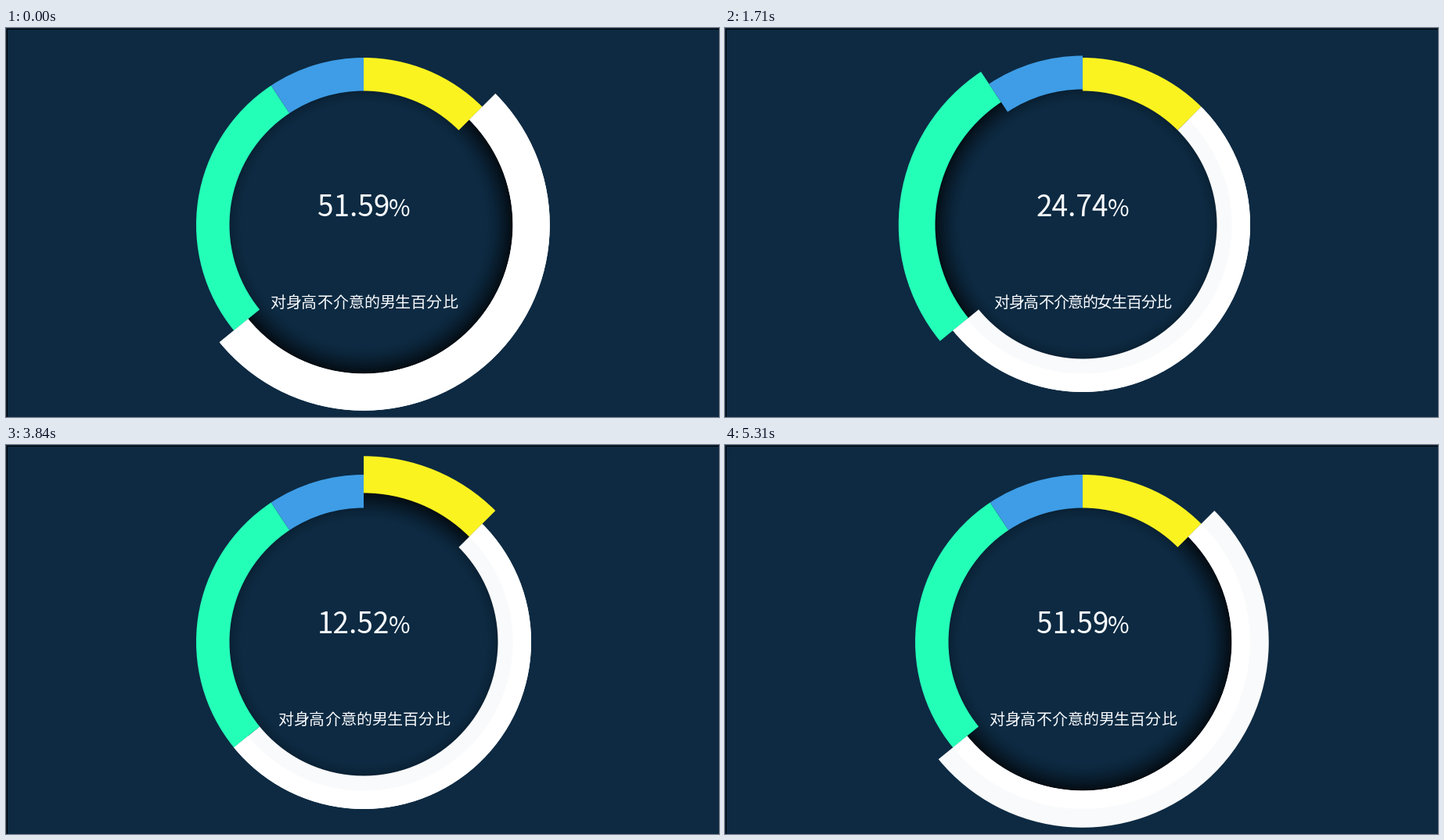
A matplotlib script that plays this animation: 911x498 px, repeating every 5.67 s.

```python
import numpy as np
import matplotlib.pyplot as plt
from matplotlib.animation import FuncAnimation
from matplotlib.patches import Wedge

W, H, DPI = 911, 498, 64
CX, CY = 457, 252
OUTER, INNER, GROW = 214, 171.5, 0.111
OUTER_BIG, INNER_BIG = OUTER * (1 + GROW), INNER * (1 + GROW)
STEP_MS, FRAMES, MORPH = 30, 189, 31
FONT = "Noto Sans CJK JP"
TEXT_COLOR = "#fafcff"

# name: (share, color, caption), clockwise from the top
SLICES = {
    "yellow": (12.52, "#fbf320", "对身高介意的男生百分比"),
    "white": (51.59, "#f9fafb", "对身高不介意的男生百分比"),
    "green": (26.57, "#24ffb8", "对身高不介意的女生百分比"),
    "blue": (9.32, "#3e9de6", "对身高介意的女生百分比"),
}
# start frame, slice that shrinks, slice that grows
MORPHS = [(0, "white", "green"), (48, "green", "blue"),
          (97, "blue", "yellow"), (145, "yellow", "white")]

# symmetric cubic Bezier easing
s = np.linspace(0, 1, 400)
EASE_Y = 3 * s**2 - 2 * s**3
EASE_X = 3 * (1 - s)**2 * s * 0.64 + 3 * (1 - s) * s**2 * 0.36 + s**3


def ease(x):
    return float(np.interp(x, EASE_X, EASE_Y))


def px(size):
    return size * 72 / DPI


fig = plt.figure(figsize=(W / DPI, H / DPI), dpi=DPI, facecolor="#0d2a42")
ax = fig.add_axes([0, 0, 1, 1])
ax.axis("off")


def draw_shadow(half=200):
    yy, xx = np.mgrid[-half:half, -half:half] + 0.5
    r = np.hypot(xx, yy)
    rgba = np.zeros(r.shape + (4,))
    depth = np.clip((r - 156) / 36, 0, 1)
    rgba[..., 3] = np.where(r < half, 0.78 * depth**1.5, 0)
    ax.imshow(rgba, extent=[CX - half, CX + half, CY + half, CY - half],
              interpolation="nearest", aspect="auto", zorder=1)


draw_shadow()
ax.set_xlim(0, W)
ax.set_ylim(H, 0)
ax.plot([0.5, 0.5, W - 0.5, W - 0.5], [H, 0.5, 0.5, H], color="black",
        lw=px(1), zorder=0, solid_joinstyle="miter")


def add_wedge(start, share, color, zorder):
    a0, a1 = (-90 + 3.6 * v for v in (start, start + share))
    wedge = Wedge((CX, CY), OUTER, a0, a1, width=OUTER - INNER,
                  fc=color, ec="none", lw=0, zorder=zorder)
    return ax.add_patch(wedge)


def set_ring(wedge, inner, outer):
    wedge.set_radius(outer)
    wedge.set_width(outer - inner)


wedges, start = {}, 0
for name, (share, color, _) in SLICES.items():
    wedges[name] = add_wedge(start, share, color, 2)
    if name == "white":
        core = add_wedge(start, share, "white", 3)
    start += share


def add_text(x, y, size):
    return ax.text(x, y, "", fontsize=px(size), family=FONT,
                   color=TEXT_COLOR, va="baseline", ha="left", zorder=5)


number = add_text(398, 241, 37)
percent = add_text(489, 241, 30)
percent.set_text("%")
letters = [add_text(CX, 358, 20) for _ in range(12)]


def set_caption(caption, spread):
    for i, letter in enumerate(letters):
        letter.set_text(caption[i] if i < len(caption) else "")
        letter.set_x(CX - 10 + (i - (len(caption) - 1) / 2) * 20 * spread)


def caption_spread(step, mid=15.15):
    """1 is normal spacing, 0 has all letters piled up in the middle."""
    if step <= 0 or step >= MORPH:
        return 1
    return 1 - 2 ** (-10 * abs(step - mid) / mid)


def update(n):
    begin, old, new = [m for m in MORPHS if m[0] <= n][-1]
    step = min(n - begin, MORPH)
    p = ease(step / MORPH)

    for name, wedge in wedges.items():
        scale = 1 + GROW * (p if name == new else 1 - p if name == old else 0)
        set_ring(wedge, INNER * scale, OUTER * scale)
    white = wedges["white"]
    rim = OUTER_BIG if n <= MORPH else OUTER
    set_ring(core, max(white.r - white.width, INNER_BIG), min(white.r, rim))

    a, b = SLICES[old][0], SLICES[new][0]
    label = f"{a + (b - a) * p:.2f}"
    shift = 10.25 * (5 - len(label))
    number.set_text(label)
    number.set_x(398 + shift)
    percent.set_x(489 - shift)
    set_caption(SLICES[old if step <= 15 else new][2], caption_spread(step))
    return []


anim = FuncAnimation(fig, update, frames=FRAMES, interval=STEP_MS,
                     repeat=True, repeat_delay=0, blit=False)
plt.show()
```
